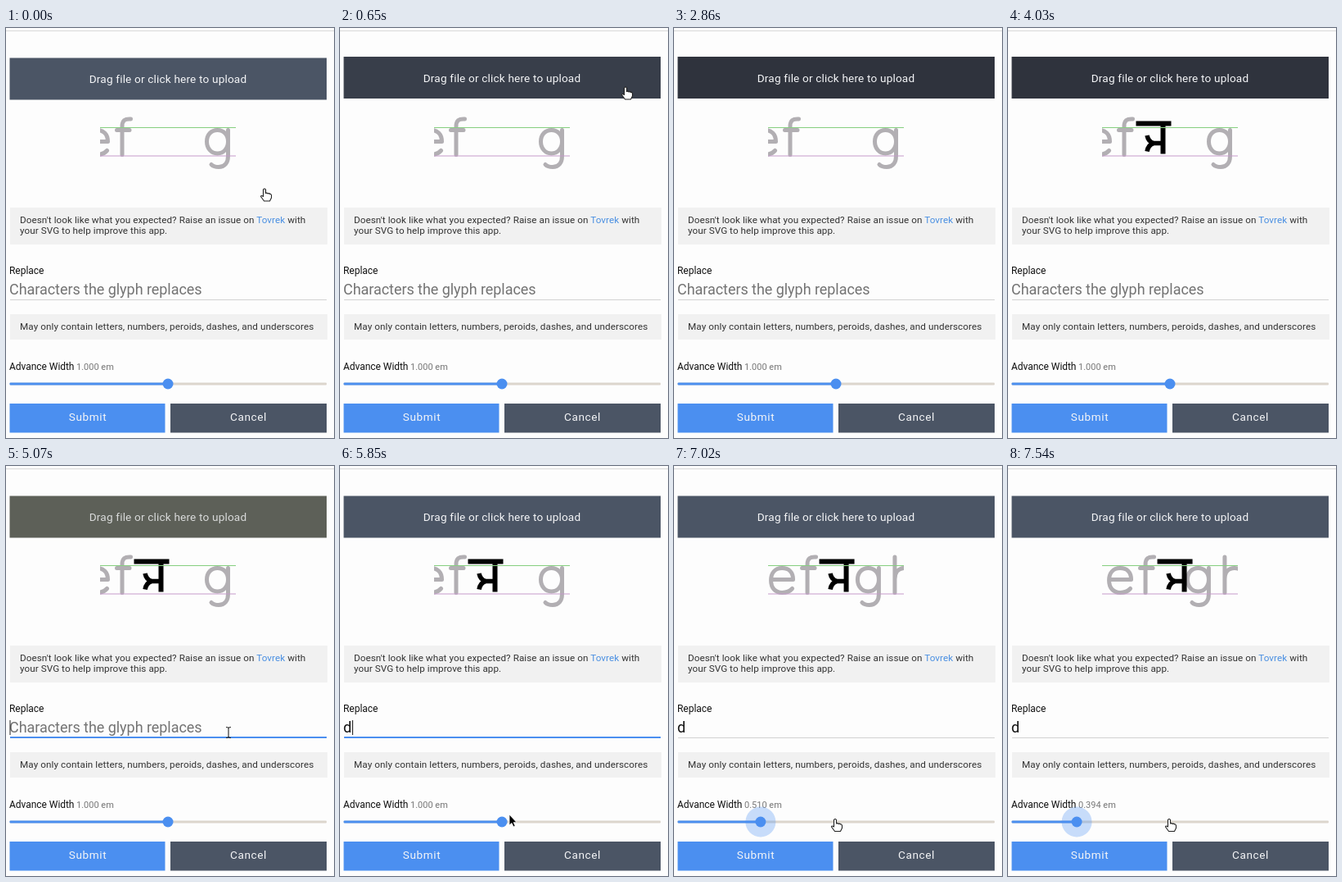
Animation, 401 px wide and 500 px high, one loop 8000 ms. Source, as an HTML page:

```html
<!DOCTYPE html>
<html lang="en">
<head>
<meta charset="utf-8">
<title>Glyph upload form</title>
<style>
  html, body { margin: 0; width: 100%; height: 100%; overflow: hidden; background: #fdfdfd; }
  svg { display: block; width: 401px; height: 500px; }
  text { font-family: Roboto, "Liberation Sans", sans-serif; white-space: pre; }
  .button { fill: #f4f5f7; font-size: 13.6px; letter-spacing: .17px; text-anchor: middle; }
  .wide { letter-spacing: .6px; }
  .note { fill: #333; font-size: 11.7px; letter-spacing: .06px; }
  .hint { letter-spacing: .085px; }
  .label { fill: #111; font-size: 12px; letter-spacing: -.04px; }
  .value { fill: #777; font-size: 11px; }
  .field { fill: #737373; font-size: 18px; letter-spacing: -.05px; }
  .letters path { fill: none; stroke: #b2afb3; stroke-width: 5; stroke-linecap: round; stroke-linejoin: round; }
  .glyph { fill: none; stroke: #000; stroke-width: 6; }
  .pointer { fill: #fff; stroke: #222; stroke-width: 1.1; stroke-linejoin: round; }
</style>
</head>
<body>
<svg viewBox="0 0 401 500">
  <defs><clipPath id="view"><rect x="115" y="100" width="166" height="80"/></clipPath></defs>
  <rect width="401" height="500" fill="#fdfdfd"/>
  <rect y="3" width="401" height="1" fill="#d9d9d9"/>

  <rect id="uploadBox" x="4.500" width="387.500" height="51"/>
  <text id="uploadText" class="button" x="198" y="67">Drag file or click here to upload</text>

  <g clip-path="url(#view)">
    <g class="letters">
      <g id="before">
        <path d="M98 138.500H124.500C124.500 129 119 124.500 111 124.500C102 124.500 97.500 131 97.500 139.500C97.500 149 103 154.500 111 154.500C117 154.500 120.500 153 123.500 149.500"/>
        <path d="M142 154.500V120C142 113 145 110.500 152.500 111M135.500 124.500H151"/>
      </g>
      <g id="after">
        <path d="M271.500 138.500C271.500 130 266 124.500 258.500 124.500C251 124.500 245.500 130 245.500 138.500C245.500 147 251 153 258.500 153C266 153 271.500 147 271.500 138.500ZM271.500 124.500V156C271.500 165 267 169.500 260 169.500C256 169.500 253 168.500 251 166.500"/>
        <path d="M291 111V154.500M291 138C291 129 296 124.500 303 124.500C310 124.500 314 129 314 137V154.500"/>
      </g>
    </g>
    <g id="glyph" class="glyph">
      <path d="M156.500 116.500H199.500M189.500 116.500V153.500"/>
      <path d="M170 131Q171.500 138.500 178 140.500Q171.500 142.500 170 150.500M177 140.500H188" stroke-width="5.500"/>
    </g>
    <path d="M115 121.500H281" stroke="#86cf80"/>
    <path d="M115 156H281" stroke="#c69bcb"/>
  </g>

  <rect x="5" y="219" width="388" height="45" fill="#f1f1f1"/>
  <text class="note" x="17" y="238">Doesn't look like what you expected? Raise an issue on <tspan fill="#4a8fe2">Tovrek</tspan> with</text>
  <text class="note" x="17" y="251">your SVG to help improve this app.</text>

  <text class="label" x="4" y="300">Replace</text>
  <text id="field" class="field" x="4" y="325"></text>
  <rect id="underline" x="5" width="387"/>
  <rect id="caret" y="310" width="1" height="18" fill="#222"/>

  <rect x="5" y="349" width="388" height="31" fill="#f1f1f1"/>
  <text class="note hint" x="17" y="368">May only contain letters, numbers, peroids, dashes, and underscores</text>

  <text class="label" x="4" y="417">Advance Width</text>
  <text id="value" class="value" x="86" y="417"></text>
  <rect x="4.500" y="432.500" width="387.500" height="3" rx="1" fill="#dcd6cd"/>
  <rect id="done" x="4.500" y="432.500" height="3" rx="1" fill="#4b8ff0"/>
  <circle id="halo" cy="434" r="18.500" fill="#4b8ff0" fill-opacity=".3"/>
  <circle id="thumb" cy="434" r="6.500" fill="#4b8ff0"/>

  <rect x="4.500" y="458" width="190" height="35.500" fill="#4b8ff0"/>
  <rect x="201" y="458" width="191" height="35.500" fill="#4b5565"/>
  <text class="button wide" x="100" y="479">Submit</text>
  <text class="button wide" x="296.500" y="479">Cancel</text>

  <path id="hand" class="pointer" d="M-1.500 8V1Q0 -1 1.500 1V5.500Q3 4.500 4 6Q5.500 5 6.500 6.500Q8 6 8.500 8V11L6.500 15H-.5L-4.500 9.500Q-4.500 7.500 -1.500 9.500Z"/>
  <path id="beam" d="M-3 -6.500Q0 -6.500 0 -5Q0 -6.500 3 -6.500M0 -5V5M-3 6.500Q0 6.500 0 5Q0 6.500 3 6.500" fill="none" stroke="#222" stroke-width="1.100"/>
  <path id="arrow" d="M0 0V13L3 10.500L5 15L7.200 14L5.200 9.700H9Z" fill="#000" stroke="#fff" stroke-width=".8"/>
</svg>
<script>
const LOOP = 8000, STEP = 130;
const el = id => document.getElementById(id);
const set = (id, attrs) => {
  for (const k in attrs) el(id).setAttribute(k, attrs[k]);
};
const show = (id, on) => set(id, { visibility: on ? "visible" : "hidden" });

// Keys are [time, ...numbers], linear in between.
function track(keys, t) {
  let i = 0;
  while (i < keys.length - 1 && t >= keys[i + 1][0]) i++;
  const a = keys[i], b = keys[i + 1] || a;
  const p = b === a ? 0 : Math.max(0, (t - a[0]) / (b[0] - a[0]));
  return a.slice(1).map((n, k) => n + (b[k + 1] - n) * p);
}

const pointerPath = [
  [0, 316, 196], [130, 318, 190], [390, 335, 125], [650, 349, 72], [780, 351, 62],
  [1040, 351, 62], [1300, 351, 59], [4160, 340, 120], [4290, 330, 160],
  [4550, 330, 160], [4810, 272, 325], [5200, 272, 325], [5850, 207, 425],
  [5980, 204, 428], [6240, 197, 430.5]
];
const uploadColor = [
  [390, 75, 85, 101], [780, 47, 51, 61], [4940, 47, 51, 61],
  [5070, 93, 96, 88], [5200, 75, 85, 101]
];
const widthKeys = [[6240, 1], [7020, .51], [7540, .394]];

function pointerKind(t) {
  if (t >= 2860 && t < 4160) return "";
  if (t < 2860 || t >= 6110) return "hand";
  return t >= 4680 && t < 5330 ? "beam" : "arrow";
}

function draw(t) {
  const hover = t >= 650 && t < 4940;
  set("uploadBox", {
    fill: `rgb(${track(uploadColor, t).map(Math.round)})`,
    y: hover ? 35 : 36.5
  });
  set("uploadText", { y: hover ? 66 : 67, "fill-opacity": t >= 5070 && t < 5200 ? .82 : 1 });

  const [em] = track(widthKeys, t);
  const shift = 43 * (1 - em);
  set("before", { transform: `translate(${shift})` });
  set("glyph", { transform: `translate(${shift})` });
  set("after", { transform: `translate(${-shift})` });
  show("glyph", t >= 4030);

  const typed = t >= 5460, focus = t >= 5070 && t < 6240;
  el("field").textContent = typed ? "d" : "Characters the glyph replaces";
  set("field", { style: typed ? "fill:#111" : "" });
  set("underline", {
    y: focus ? 330 : 331, height: focus ? 2 : 1, fill: focus ? "#4b8ff0" : "#d2d2d2"
  });
  set("caret", { x: typed ? 15 : 4.5 });
  show("caret", focus);

  const x = 10 + 188 * em;
  el("value").textContent = em.toFixed(3) + " em";
  set("done", { width: x - 4.5 });
  set("thumb", { cx: x });
  set("halo", { cx: x });
  show("halo", t >= 6240);

  const kind = pointerKind(t), [px, py] = track(pointerPath, t);
  for (const id of ["hand", "beam", "arrow"]) {
    set(id, { transform: `translate(${px} ${py})` });
    show(id, id === kind);
  }
}

const start = performance.now();
function frame() {
  const t = (performance.now() - start) % LOOP;
  draw(Math.floor(t / STEP + 1e-6) * STEP);
  requestAnimationFrame(frame);
}
draw(0);
requestAnimationFrame(frame);
</script>
</body>
</html>
```
